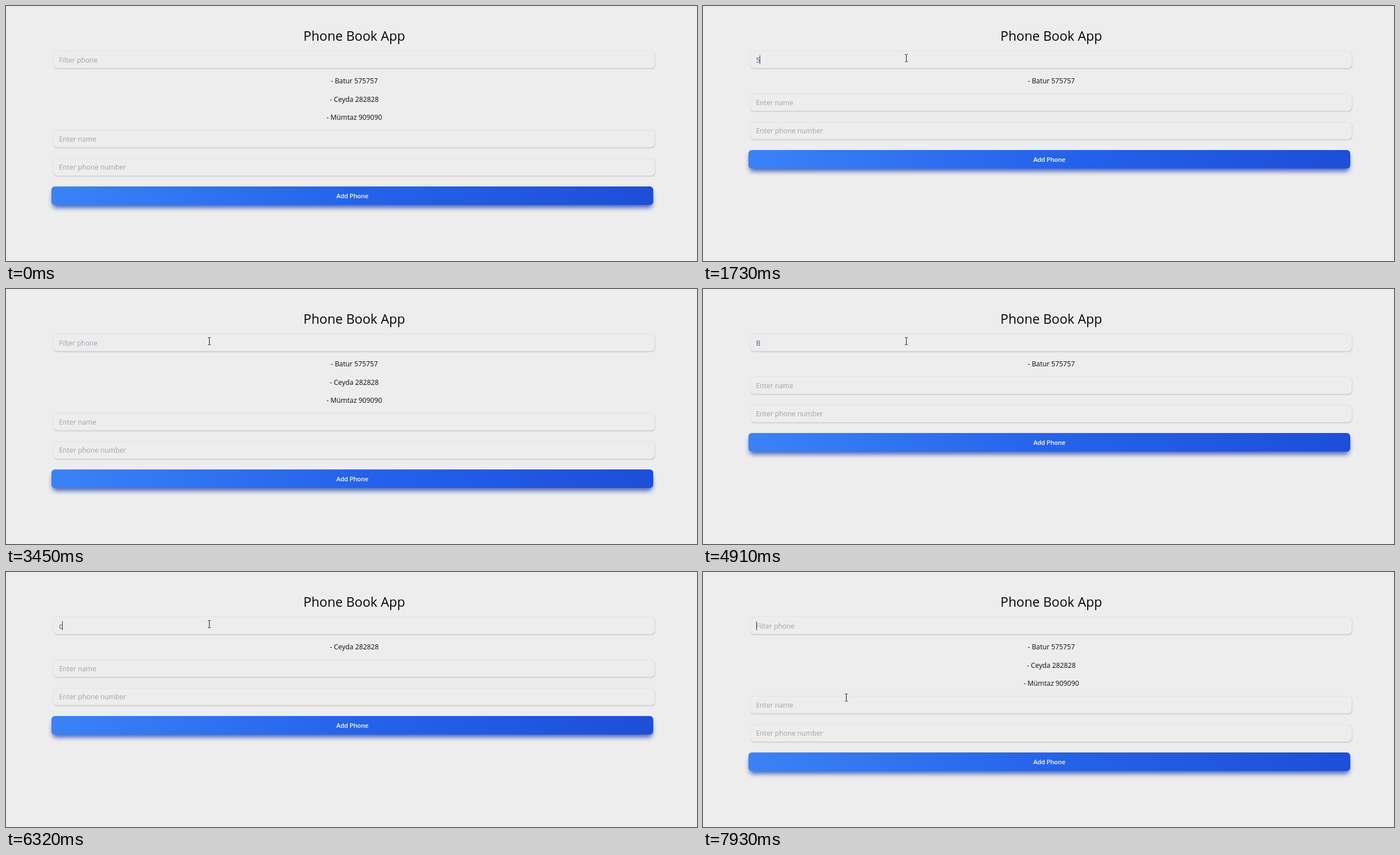
Animation, 1232 px wide and 455 px high, one loop 8 s. Source, as an HTML page:

```html
<!DOCTYPE html>
<html lang="en">
<head>
<meta charset="utf-8">
<title>Phone Book App</title>
<style>
  html, body { margin: 0; width: 100%; height: 100%; overflow: hidden; background: #ededed; }
  svg { display: block; width: 100vw; height: 100vh; }
  text { font: 12.25px "Open Sans", "Noto Sans", sans-serif; fill: #0a0a0c; white-space: pre; }
  .mid { text-anchor: middle; }
  #title { font-size: 23.4px; fill: #050508; }
  .hint { fill: #a1a1ae; }
  #label { font-size: 11.2px; font-weight: 600; letter-spacing: -.2px; fill: #fff; }
  .soft { filter: blur(1px); fill: #000; opacity: .22; }
  .box { fill: #ededed; stroke: #e4e5e9; }
  #glow { filter: blur(4.2px); fill: #1e40af; opacity: .8; }
</style>
</head>
<body>
<svg viewBox="0 0 1232 455" xmlns="http://www.w3.org/2000/svg">
  <defs>
    <linearGradient id="blue">
      <stop offset="0" stop-color="#3b82f6"/>
      <stop offset=".5" stop-color="#2563eb"/>
      <stop offset="1" stop-color="#1d4ed8"/>
    </linearGradient>
    <g id="field">
      <rect class="soft" x="85" y="1.3" width="1072" height="30.5" rx="6.5"/>
      <rect class="box" x="84.5" y=".5" width="1072" height="30" rx="6.5"/>
    </g>
  </defs>

  <text id="title" class="mid" x="621" y="62">Phone Book App</text>
  <use href="#field" y="80"/>
  <text id="hint" class="hint" x="94.5" y="101">Filter phone</text>
  <text id="typed" x="94.5" y="101"></text>
  <rect id="caret" y="88" width="1" height="16" fill="#30303c"/>
  <g id="list"></g>

  <g id="form">
    <use href="#field" y="221.5"/>
    <text class="hint" x="94.5" y="242">Enter name</text>
    <use href="#field" y="272"/>
    <text class="hint" x="94.5" y="292">Enter phone number</text>
    <rect id="glow" x="83" y="329" width="1069" height="31" rx="6"/>
    <rect x="81" y="322" width="1073" height="33" rx="6" fill="url(#blue)"/>
    <text id="label" class="mid" x="617.5" y="343">Add Phone</text>
  </g>

  <g id="pointer">
    <path id="beam" d="M-2.5 -6.5h2M.5 -6.5h2M0 -6v12M-2.5 6.5h2M.5 6.5h2" fill="none" stroke="#16161a"/>
    <path id="arrow" d="M0 0V16L3.7 12.6L6.2 18.4L8.6 17.4L6.2 11.7H11.4Z" fill="#fff" stroke="#111"/>
    <path id="hand" d="M-1.5 1Q0 -1 1.5 1V7L9 8.6Q11 9.4 10.5 12L8.5 19H0L-5 12Q-5 9 -1.5 11Z" fill="#fff" stroke="#111"/>
  </g>
</svg>
<script>
const LOOP = 8000, STEP = 70, ROW = 32.5;
const people = ["Batur 575757", "Ceyda 282828", "Mümtaz 909090"];

// time, filter text, caret shown
const typing = [
  [0, "", 0], [1380, "", 1], [1600, "5", 1], [1860, "57", 1], [2460, "57", 0],
  [2860, "5", 0], [2930, "5", 1], [3190, "", 1], [3450, "", 0],
  [3980, "B", 1], [4180, "Ba", 1], [4780, "Ba", 0], [4910, "B", 0],
  [5110, "", 0], [5240, "", 1], [5790, "", 0],
  [6320, "c", 1], [6450, "ce", 1], [6910, "c", 1], [6980, "c", 0],
  [7050, "", 0], [7510, "", 1]
];

// pointer strokes: start, number of steps, from, to
const strokes = [
  [230, 3, [980, 485], [576, 285.5]],
  [630, 8, [576, 285.5], [362, 93]],
  [7510, 7, [362, 93], [255.5, 224]]
];

const $ = id => document.getElementById(id);
const show = (el, on) => el.setAttribute("visibility", on ? "visible" : "hidden");
const move = (el, x, y) => el.setAttribute("transform", `translate(${x} ${y})`);

const rows = people.map(person => {
  const row = document.createElementNS("http://www.w3.org/2000/svg", "text");
  row.setAttribute("class", "mid");
  row.setAttribute("x", 621);
  row.textContent = "- " + person;
  $("list").append(row);
  return row;
});

function drawFilter(t) {
  const [, value, caret] = typing.findLast(k => k[0] <= t);
  let count = 0;
  rows.forEach((row, i) => {
    const hit = people[i].toLowerCase().includes(value.toLowerCase());
    show(row, hit);
    if (hit) row.setAttribute("y", Math.round(138 + ROW * count++));
  });
  move($("form"), 0, (count - rows.length) * ROW);

  const typed = $("typed");
  typed.textContent = value;
  typed.style.fill = /^c/.test(value) ? "#3a4a72" : "#3f5ba8";
  show($("hint"), !value);
  const width = value ? typed.getComputedTextLength() : 0;
  $("caret").setAttribute("x", Math.floor(95 + width - (value ? .5 : 0)));
  show($("caret"), caret);
}

function pointerAt(t) {
  const stroke = strokes.findLast(s => s[0] <= t);
  if (!stroke) return null;
  const [start, steps, from, to] = stroke;
  const p = Math.min(1, (Math.floor((t - start) / STEP) + 1) / steps);
  const e = p * p * (3 - 2 * p);
  return from.map((v, i) => v + (to[i] - v) * e);
}

function pointerShape([x, y]) {
  const within = (a, b) => y >= a && y <= b;
  if (within(322, 355)) return "hand";
  const overField = within(80, 111) || within(222, 252) || within(272, 303);
  const overList = within(122, 210) && Math.abs(x - 621) < 52;
  return overField || overList ? "beam" : "arrow";
}

function drawPointer(t) {
  const at = pointerAt(t);
  const shape = at && pointerShape(at);
  for (const id of ["beam", "arrow", "hand"]) show($(id), id === shape);
  if (at) move($("pointer"), Math.floor(at[0]) + .5, Math.floor(at[1]));
}

function frame() {
  const t = performance.now() % LOOP;
  drawFilter(t);
  drawPointer(t);
  requestAnimationFrame(frame);
}
frame();
</script>
</body>
</html>
```
